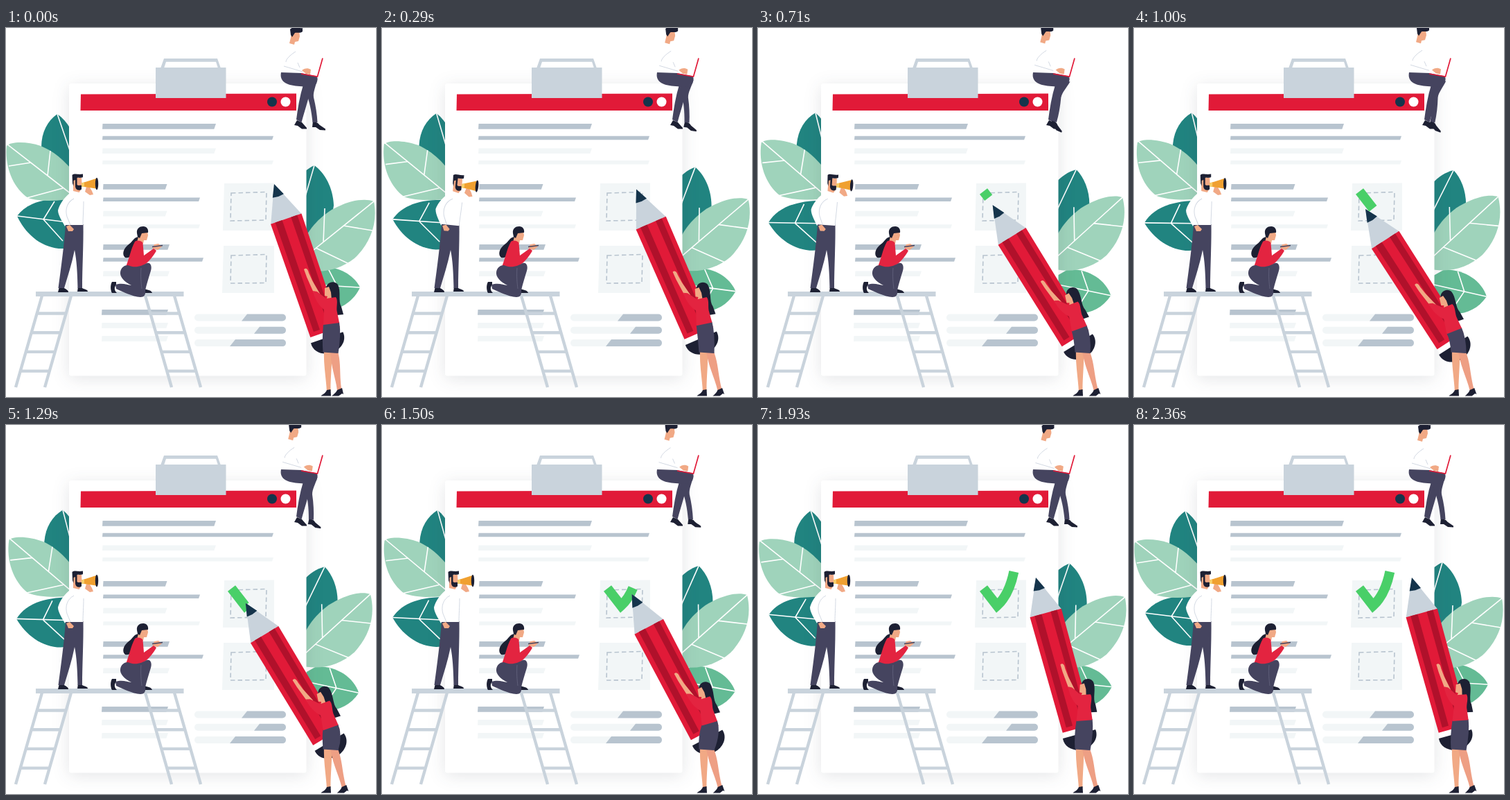
Recreate the animation shown at these times as an HTML page. Size 534x532 px, loop 2430 ms.

```html
<!DOCTYPE html>
<html lang="en">
<head>
<meta charset="utf-8">
<title>Checklist</title>
<style>
html, body { margin: 0; width: 100%; height: 100%; overflow: hidden; background: #fff; }
svg { display: block; width: 100vw; height: 100vh; }
.sheet { filter: drop-shadow(0 4px 12px rgba(30, 40, 60, .12)); }
.vein { fill: none; stroke: #fff; stroke-width: 1.6; }
.crease { fill: none; stroke: #d3d9e3; stroke-width: 1; }
.teal { fill: #218480; }
.mint { fill: #9fd3bb; }
.green { fill: #64bb95; }
.red { fill: #e11a38; }
.top { fill: #e32440; }
.wine { fill: #b0112b; }
.ink { fill: #1d2033; }
.navy { fill: #15344b; }
.cloth { fill: #45445f; }
.skin { fill: #f1a985; }
.white { fill: #fff; }
.steel { fill: #c9d3dc; }
.line { fill: #b8c4cf; }
.pale { fill: #f2f6f7; }
.dash { fill: none; stroke: #b8c4cf; stroke-width: 1.6; stroke-dasharray: 6.5 4; }
.rail { fill: none; stroke: #c9d3dc; stroke-width: 4.4; }
</style>
</head>
<body>
<svg viewBox="0 0 534 532" preserveAspectRatio="none">
  <!-- leaves -->
  <g id="leafA">
    <path class="teal" d="M74 124C60 134 51 150 51 172C52 190 70 215 105 232C114 198 104 145 74 124Z"/>
    <path class="vein" d="M74 124L95 185"/>
  </g>
  <g id="leafB">
    <path class="teal" d="M16 271C32 250 62 242 108 249V318H76C48 315 27 295 16 271Z"/>
    <path class="vein" d="M16 271L105 282M54 276L70 250M54 276L82 307"/>
  </g>
  <g id="leafC">
    <path class="mint" d="M1 170C8 163 32 164 50 170C74 180 86 194 104 214V244C80 250 50 251 32 245C10 230 -2 200 1 170Z"/>
    <path class="vein" d="M2 168L104 247M36 194L4 199M60 213L64 177M82 231L30 245"/>
  </g>
  <g id="leafD">
    <path class="teal" d="M445 198C460 209 472 230 473 256C470 280 450 310 410 335C398 280 402 218 445 198Z"/>
    <path class="vein" d="M445 198L424 270"/>
  </g>
  <g id="leafE">
    <path class="green" d="M511 374C500 352 472 340 444 346L420 365L438 402C466 413 497 404 511 374Z"/>
    <path class="vein" d="M511 374L425 369M478 372L464 345M478 372L462 407"/>
  </g>
  <g id="leafF">
    <path class="mint" d="M531 250C516 244 492 250 470 262C446 278 434 294 422 322V346C450 356 480 350 503 332C526 310 537 281 531 250Z"/>
    <path class="vein" d="M531 250L424 336M458 309L460 260M487 285L529 292M447 317L497 341"/>
  </g>

  <!-- clipboard -->
  <rect class="sheet white" x="91" y="80" width="342.5" height="421.5" rx="3"/>
  <path class="red" d="M108 95.500L419 94.500V119L107.500 119Z"/>
  <circle class="navy" cx="384" cy="106.5" r="7"/>
  <circle class="white" cx="403.5" cy="106.5" r="7"/>
  <path class="steel" fill-rule="evenodd" d="M223 58L228 44H305L310 58ZM228 58H306L303 48.7H231Z"/>
  <rect class="steel" x="216" y="57" width="101.5" height="44"/>
  <g id="lines"></g>
  <path class="pale" d="M315 224L387 223.5V292H313ZM314 314H387V382H312Z"/>
  <path class="dash" d="M325 238L376 236.5L375 277L324 278ZM325 328L376 326.5L375 367.5L324 368Z"/>
  <g id="pills"></g>

  <!-- scaffold -->
  <path id="ladders" class="rail"/>
  <rect class="steel" x="43" y="380" width="213.5" height="7"/>

  <!-- speaker -->
  <path class="ink" d="M77 373L84 375C87 377 90 378 90 381H75ZM104 373L110 375C114 377 118 377 118 380H103Z"/>
  <path class="cloth" d="M86 283H111.500C112 312 110 345 110 375H103.500C103 352 102 335 99 320C95 340 89 358 84 375H75.500C80 342 84 312 86 283Z"/>
  <g id="speaker">
    <path class="skin" d="M97 216H109L109.500 226L108 233L105 238H97Z"/>
    <path class="ink" d="M95.500 212C99 209 103 212 111 210.500V215C108 216.500 105 215.500 102.500 216V226C105 228 107 226 109 227V232.500C106 235 101 234 100 229V219L97.500 220V228L96 224Z"/>
    <path class="white" d="M97 235L110 238C114 252 112 270 111 284H86L85 286C82 280 75 270 75 263C77 254 86 241 97 235Z"/>
    <path class="crease" d="M98 246C88 251 85 262 88 272L93 284M112 250C112 262 111 274 111 283"/>
    <path class="skin" d="M87 286L92 284L98 290L96 293H90ZM114 236L116 229L121 230L124 235L126 240L121 241Z"/>
    <path d="M109 223.500L116 221.500L130 217V231.500L116 229.500L109 228.500Z" fill="#f0a030"/>
    <path d="M109 223.500L113 222.500V229L109 228.500Z" fill="#f7cf6b"/>
    <ellipse class="ink" cx="131" cy="224.500" rx="2.200" ry="8.700"/>
  </g>

  <!-- writer -->
  <path class="ink" d="M159 366H153C150 371 151 379 153 382H160C156 378 156 374 159 370ZM200 376C205 378 210 378 211 382H199Z"/>
  <path class="ink" d="M191 301C183 303 184 307 177 312C169 318 167 327 172 331C179 333 184 326 186 318L194 308Z"/>
  <path class="skin" d="M194 293H204L205 299L203 306H199L198 311L189 309L191 301ZM211 318L214 312L220 311L225 315L219 320Z"/>
  <path class="ink" d="M189 296C188 289 193 286 198 286C203 286 206 290 205 295L196 296L193 303L190 301Z"/>
  <path d="M211 315.500L226 313.500" stroke="#45445f" stroke-width="1.500"/>
  <path class="top" d="M186 308C190 305 196 307 197.500 310L199 328L213 318L217 321C213 329 205 338 199 342L194 347L173 344C178 332 180 319 186 308Z"/>
  <path class="cloth" d="M158 370C167 367 175 370 181 371C171 366 164 359 165 352C166 345 171 342 176 342C187 347 196 343 203 339C209 337 211 344 209 350C206 360 203 369 201 378C202 385 199 388 194 388C182 387 170 381 159 376Z"/>
  <path d="M195 346C194 357 195 368 196 376" fill="none" stroke="#6b6a84" stroke-width=".7"/>

  <!-- laptop user -->
  <path class="ink" d="M420 133L427 136L434 144V145.500H427L421 141L416 140Z"/>
  <path class="cloth" d="M429 82H442C437 100 431 120 426.500 136L419 132C421 116 424 98 429 82Z"/>
  <g id="shin">
    <path class="ink" d="M443 134L450 137C453 141 458 143 461 145.500V147.500L453 147L447 143L442 143Z"/>
    <path class="cloth" d="M430 82L449 74C447 85 443 92 444 100C447 112 449 125 449.500 136L442.500 136C441 120 438 105 432 90Z"/>
  </g>
  <path class="cloth" d="M397 64L426 65L446 69C451 70 450 75 448 80C444 87 434 85 424 84C408 83 394 79 397 64Z"/>
  <g id="sitter">
    <path class="skin" d="M412 7L423 4L424 12L422 19L417 20L416 24L409 22L411 14Z"/>
    <path class="ink" d="M410 2C414 -3 423 1 428 0V5C425 8 420 6 417 7L413 13L411 10Z"/>
    <path class="crease" d="M418 34C410 39 404 45 404 49M401 55L428 63M421 50L424 57"/>
  </g>
  <path id="typing" class="skin" d="M427 61C430 58 436 57 440 60L439 67L433 66Z"/>
  <path d="M457 43.500L449.500 70L426 66" fill="none" stroke="#e11a38" stroke-width="1.700"/>

  <!-- tick, pencil, holder -->
  <path id="tick" d="M325.500 235.500L345 260.500C357 250 365 232 369.300 211.500" fill="none" stroke="#49cf68" stroke-width="14"/>
  <g id="pencil">
    <path class="white" d="M-22 224H22V236H-23Z"/>
    <path class="ink" d="M-24.500 234H24.500C26 248 13 257 0 257C-13 257 -26 248 -24.500 234Z"/>
    <path class="steel" d="M0 0L23.500 53.500H-23.500Z"/>
    <path class="navy" d="M0 0L8.500 18L0 19L-8.500 18Z"/>
    <path class="red" d="M-23.500 53H23.500L22.500 226H-22.500Z"/>
    <path class="wine" d="M-16.500 53H-6V220H-15.500ZM7.500 53H17L16 220H7.500Z"/>
  </g>
  <path class="skin" d="M459 464H470C471 485 468 505 468.500 523L463 525C462 505 458 485 459 464Z"/>
  <path class="ink" d="M463 522L468.500 521L469 530.500H454.500C457 528 461 527 463 522Z"/>
  <g id="leg">
    <path d="M468 464H478C484 480 481 500 484 520L478 523C476 505 469 490 468 464Z" fill="#ee9f84"/>
    <path class="ink" d="M478 522L485 519L487 528L485 527L480 530.500H470C473 528 476 526 478 522Z"/>
  </g>
  <path id="skirt" class="cloth"/>
  <g id="holder">
    <path class="ink" d="M462 376C462 366 474 363 479 370C484 380 479 394 484 402L487 413L477 414L468 392Z"/>
    <path class="skin" d="M430 348C433 345 436 348 437 353L442 364L453 383L446 386L434 359ZM460 375L466 373L469 381L470 392H462L464 387L460 386Z"/>
    <path class="top" d="M443 379L449 380L462 390L476 388C480 393 476 403 478 410L481 425L458 428L459 406C452 401 445 390 443 379Z"/>
  </g>
</svg>
<script>
const LOOP = 2430, $ = id => document.getElementById(id);

// A block of text bars, alternately short and long; the first few are dark
function block(x, y, gap, short, long, count, dark = 2) {
  let out = '';
  for (let i = 0; i < count; i++) {
    const end = i % 2 ? long : short, h = end === short ? 7.7 : 5.5, top = y + i * gap;
    out += `<path class="${i < dark ? 'line' : 'pale'}" d="M${x + .5} ${top}H${end}l${-h * .35} ${h}H${x}Z"/>`;
  }
  return out;
}
$('lines').innerHTML = block(139, 138, 17.7, 303, 386, 4) + block(140, 225, 19.4, 232.5, 280, 4) +
  block(140, 312, 19.2, 236, 285, 3) + block(138, 406, 19, 234, 234, 3, 1);

$('pills').innerHTML = [348, 366, 331].map((x, i) => {
  const y = 412.5 + i * 18.3;
  return `<rect class="pale" x="272" y="${y}" width="132" height="10" rx="5"/>` +
    `<path class="line" d="M${x} ${y}H399a5 5 0 0 1 0 10H${x - 8}Z"/>`;
}).join('');

// Left ladder leans left, right ladder leans right
function ladder(x, lean) {
  let d = `M${x} 386l${lean * 38} 132m42 0l${-lean * 38} -132`;
  for (let i = 0; i < 4; i++) d += `M${x + lean * (7 + 8 * i)} ${411.5 + 27.7 * i}h42`;
  return d;
}
$('ladders').setAttribute('d', ladder(52, -1) + ladder(201, 1));

// Progress from time a to b, sine easing with a power, and a rise followed by a fall
const ramp = (t, a, b) => Math.min(1, Math.max(0, (t - a) / (b - a)));
const ease = (u, p = 1) => Math.sin(u * Math.PI / 2) ** p;
const hump = (t, peak, end, p = 1) => t < peak ? ease(t / peak, p) : 1 - ease(ramp(t, peak, end), 2);

const move = (id, value) => $(id).setAttribute('transform', value);
const turn = (id, deg, x, y) => move(id, `rotate(${deg} ${x} ${y})`);

function draw(t) {
  const l = hump(t, 900, 2400), r = hump(t, 1040, 2400);
  turn('leafA', 5.3 * l, 98, 225);
  turn('leafB', -6.4 * l, 105, 285);
  turn('leafC', 3.1 * l, 95, 242);
  turn('leafD', 10.5 * r, 415, 290);
  turn('leafE', 9.5 * r, 430, 368);
  turn('leafF', -3.8 * r, 428, 330);

  turn('speaker', 6.5 * hump(t, 430, 1070), 98, 287);
  turn('shin', 19 * hump(t, 760, 1600, 2), 440, 80);
  move('sitter', `translate(${-2 * r} ${-1.8 * r})`);
  move('typing', `translate(${3 * r} ${-.5 * r})`);

  // Pencil swings down to the box, then speeds up on its way back
  const back = ramp(t, 1000, 1930);
  const x = 387 - 53 * ease(ramp(t, 0, 930), 1.3) + 67 * back ** 1.5;
  const y = 225 + 36 * ease(ramp(t, 0, 960), 2) - 41 * ease(back, 3);
  const a = 19 + 13.8 * ease(ramp(t, 0, 880), 1.6) - 17.3 * back ** 2;
  move('pencil', `translate(${x} ${y}) rotate(${-a})`);
  move('holder', `translate(${x} ${y}) rotate(${19 - a}) translate(-387 -225)`);
  move('leg', `translate(0 468) skewX(${7 * ease(ramp(t, 0, 350))}) translate(0 -468)`);

  // The skirt's waist follows the body while its hem stays put
  const k = (19 - a) * Math.PI / 180, c = Math.cos(k), s = Math.sin(k);
  const at = (px, py) => `${x + (px - 387) * c - (py - 225) * s} ${y + (px - 387) * s + (py - 225) * c}`;
  $('skirt').setAttribute('d', `M${at(458, 427)}L${at(481, 424)}Q${at(484, 442)} 479.5 469L457.5 467.5Q456 448 ${at(458, 427)}Z`);

  // Short stroke first, then the long one
  const n = 36 * ease(ramp(t, 580, 1200)) + 57 * ease(ramp(t, 1290, 1880), 1.2);
  $('tick').style.visibility = n > 0 ? 'visible' : 'hidden';
  $('tick').setAttribute('stroke-dasharray', `${n} 200`);
}

const start = performance.now();
function loop() {
  draw((performance.now() - start) % LOOP);
  requestAnimationFrame(loop);
}
loop();
</script>
</body>
</html>
```
